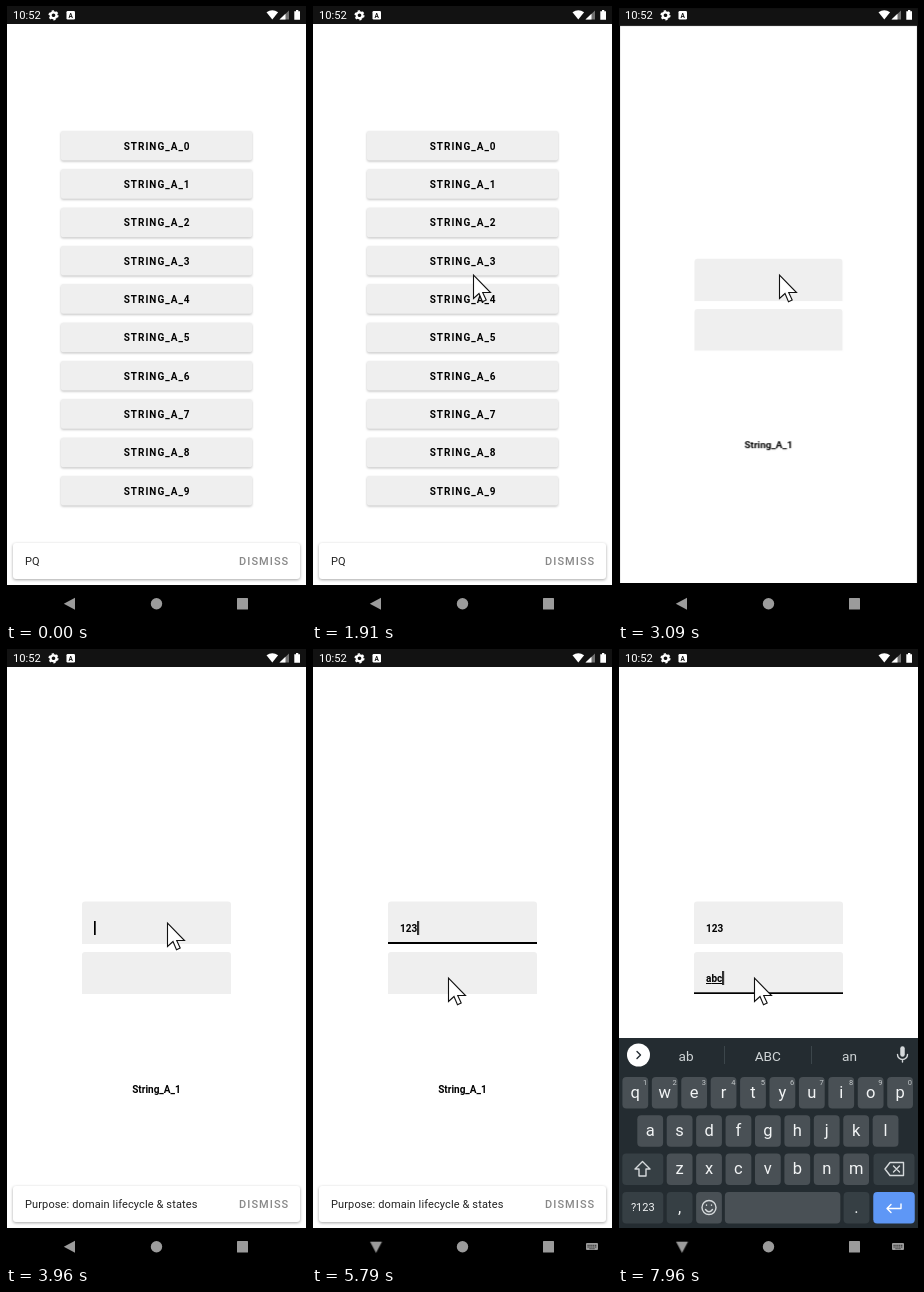
Animation, 300 px wide and 615 px high, one loop 8000 ms. Source, as an HTML page:

```html
<!DOCTYPE html>
<html lang="en">
<head>
<meta charset="utf-8">
<title>Phone form demo</title>
<style>
html, body { margin: 0; width: 100%; height: 100%; overflow: hidden; background: #000; }
svg { display: block; width: 100%; height: 100%; font-family: Roboto, "Noto Sans", sans-serif; }

.bold { font-weight: 700; font-size: 10px; }
.label { letter-spacing: 1px; }
.snack rect { fill: #fff; filter: drop-shadow(0 1.5px 1.8px rgba(0,0,0,.35)); }
.snack text { font-size: 11px; letter-spacing: .12px; fill: #222; }
.snack .action { font-weight: 500; letter-spacing: 1.05px; fill: #888; }
.face { fill: #efefef; }
#buttons rect { filter: drop-shadow(0 1px .8px rgba(0,0,0,.25)); }
.key { font-size: 16.5px; fill: #f2f4f5; text-anchor: middle; }
.hint { font-size: 7.5px; fill: #c3c8ca; text-anchor: middle; }
.word { font-size: 13.6px; fill: #cfd4d6; text-anchor: middle; }
.line { fill: none; stroke: #d5d9db; stroke-width: 1.4; stroke-linejoin: round; stroke-linecap: round; }
.composing tspan { text-decoration: underline; }

/* Every animation shares the 8 s loop; 1% = 80 ms */
.move { animation: 8s linear infinite; }
.step { animation: 8s step-end infinite; visibility: hidden; }

#cursor { animation-name: cursor; }
@keyframes cursor {
  0%, 4.75% { transform: translate(40px, 620px); }
  6.5% { transform: translate(98px, 505px); }
  8.5% { transform: translate(170px, 370px); }
  9.7% { transform: translate(191px, 295px); }
  11.2% { transform: translate(170px, 222px); }
  13.1%, 16.9% { transform: translate(134px, 178px); }
  20.5% { transform: translate(150px, 228px); }
  23.87%, 46.1% { transform: translate(161px, 269px); }
  46.5%, 55.1% { transform: translate(161px, 274px); }
  59.75%, 62% { transform: translate(148px, 304px); }
  68.8%, 100% { transform: translate(136px, 329px); }
}
#click { animation-name: click; }
@keyframes click {
  13.37%, 46.5%, 78.75% { visibility: visible; }
  14.87%, 48.12%, 80.25% { visibility: hidden; }
}
#ripple { animation-name: ripple; transform-origin: 134px 178px; opacity: 0; }
@keyframes ripple {
  0%, 16.8% { opacity: 0; transform: scale(.15); }
  17.8% { opacity: .1; transform: scale(.35); }
  20.5% { opacity: .1; transform: scale(1); }
  23.8%, 100% { opacity: 0; transform: scale(1); }
}
.window { transform-origin: 150.5px 298px; }
#list { animation-name: list; }
@keyframes list {
  0%, 36% { transform: none; visibility: visible; }
  38.2% { transform: scale(1.05); visibility: visible; }
  38.25%, 100% { transform: scale(1.05); visibility: hidden; }
}
#form { animation-name: form; opacity: 0; }
@keyframes form {
  0%, 36% { opacity: 0; transform: scale(.85); }
  37.1% { opacity: 1; transform: scale(.95); }
  38.62% { opacity: 1; transform: scale(.993); }
  40.12%, 100% { opacity: 1; transform: none; }
}
#notice { animation-name: notice; transform-origin: 150.5px 555px; opacity: 0; }
@keyframes notice {
  0%, 47% { opacity: 0; transform: scale(.8); }
  48.2% { opacity: .75; transform: scale(.96); }
  49.5%, 100% { opacity: 1; transform: none; }
}
#bar1 { animation-name: bar1; opacity: 0; }
@keyframes bar1 {
  0%, 53.24% { opacity: 0; }
  53.25%, 80.25% { opacity: 1; }
  82.5%, 100% { opacity: 0; }
}
#bar2 { animation-name: bar2; opacity: 0; }
@keyframes bar2 {
  0%, 80.25% { opacity: 0; }
  84.6%, 100% { opacity: 1; }
}
#caret { animation-name: caret; }
@keyframes caret {
  48.75% { visibility: visible; transform: none; }
  55.12% { visibility: hidden; transform: none; }
  57.5% { visibility: visible; transform: translateX(5.8px); }
  62.5% { visibility: visible; transform: translateX(11.5px); }
  68.75% { visibility: hidden; transform: translateX(11.5px); }
  72.37% { visibility: visible; transform: translateX(17.2px); }
  80.25% { visibility: visible; transform: translateY(50px); }
  84.62% { visibility: hidden; transform: translateY(50px); }
  90.75% { visibility: visible; transform: translate(5.4px, 50px); }
  94% { visibility: visible; transform: translate(11px, 50px); }
  99.5%, 100% { visibility: visible; transform: translate(16.2px, 50px); }
}
#c1 { animation-name: c1; }
@keyframes c1 { 57.5%, 100% { visibility: visible; } }
#c2 { animation-name: c2; }
@keyframes c2 { 62.5%, 100% { visibility: visible; } }
#c3 { animation-name: c3; }
@keyframes c3 { 72.37%, 100% { visibility: visible; } }
#ca { animation-name: ca; }
@keyframes ca { 90.75%, 100% { visibility: visible; } }
#cb { animation-name: cb; }
@keyframes cb { 94%, 100% { visibility: visible; } }
#cc { animation-name: cc; }
@keyframes cc { 99.5%, 100% { visibility: visible; } }
#keyboard { animation-name: keyboard; }
@keyframes keyboard { 74.25%, 100% { visibility: visible; } }
#tools { animation-name: tools; }
@keyframes tools { 74.25% { visibility: visible; } 97%, 100% { visibility: hidden; } }
#words { animation-name: words; }
@keyframes words { 97%, 100% { visibility: visible; } }
#back { animation-name: back; transform-origin: 64px 597.7px; }
@keyframes back {
  0%, 62% { transform: none; animation-timing-function: ease-in-out; }
  66%, 100% { transform: rotate(-90deg); }
}
#switcher { animation-name: switcher; }
@keyframes switcher { 57%, 100% { visibility: visible; } }
</style>
</head>
<body>
<svg viewBox="0 0 300 615">
  <defs>
    <clipPath id="screen"><rect x="1" width="299" height="615"/></clipPath>
    <clipPath id="pressed"><rect x="55" y="163" width="191" height="30" rx="2"/></clipPath>
    <g id="gear">
      <circle r="2.9" fill="none" stroke="currentColor" stroke-width="2.2"/>
      <circle r="4.3" fill="none" stroke="currentColor" stroke-width="1.6" stroke-dasharray="2.2 2.303"/>
    </g>
  </defs>
  <rect width="300" height="615"/>

  <g clip-path="url(#screen)">
    <g id="list" class="window move">
      <rect width="301" height="18" fill="#121212"/>
      <rect x="1" y="18" width="299" height="561" fill="#fff"/>
      <g id="buttons"></g>
      <g clip-path="url(#pressed)"><circle id="ripple" class="move" cx="134" cy="178" r="115"/></g>
      <g class="snack">
        <rect x="7" y="537" width="287" height="36" rx="3"/>
        <text x="19" y="559">PQ</text>
        <text class="action" x="233" y="559">DISMISS</text>
      </g>
    </g>

    <g id="form" class="window move">
      <rect width="301" height="18" fill="#121212"/>
      <rect x="1" y="18" width="299" height="561" fill="#fff"/>
      <path class="face" d="M76 295V255.500q0-3 3-3H222q3 0 3 3V295ZM76 345V306q0-3 3-3H222q3 0 3 3V345Z"/>
      <rect id="bar1" class="move" x="76" y="293" width="149" height="2"/>
      <rect id="bar2" class="move" x="76" y="343.300" width="149" height="1.700"/>
      <text class="bold" x="88" y="283"><tspan id="c1" class="step">1</tspan><tspan id="c2" class="step">2</tspan><tspan id="c3" class="step">3</tspan></text>
      <text class="bold composing" x="88" y="333"><tspan id="ca" class="step">a</tspan><tspan id="cb" class="step">b</tspan><tspan id="cc" class="step">c</tspan></text>
      <rect id="caret" class="step" x="88" y="272" width="1.700" height="14"/>
      <text class="bold" x="150.500" y="443.500" text-anchor="middle">String_A_1</text>
      <g id="notice" class="snack move">
        <rect x="7" y="537" width="287" height="36" rx="3"/>
        <text x="19" y="559">Purpose: domain lifecycle &amp; states</text>
        <text class="action" x="233" y="559">DISMISS</text>
      </g>
    </g>
  </g>

  <g id="keyboard" class="step">
    <rect x="1" y="389" width="299" height="190" fill="#242c31"/>
    <g id="keys"></g>
    <circle cx="20.500" cy="406" r="11.500" fill="#fff"/>
    <path class="line" d="M284.500 399.500v6" style="stroke-width:4.500"/>
    <path class="line" d="M279.500 405.500a5 5 0 0 0 10 0M284.500 410.500v2.500"/>
    <path class="line" d="M24.500 512.500l7.500 7.500h-4v7h-7v-7h-4z"/>
    <path class="line" d="M267 520l5-6.500h13.500v13H272zM275.500 517l6 6M281.500 517l-6 6"/>
    <circle class="line" cx="91" cy="558.500" r="7"/>
    <path class="line" d="M87.500 560.500q3.500 4.500 7 0M88.500 556v.3M93.500 556v.3"/>
    <path class="line" d="M283 555v4.500H269.500M273 555.500l-4 4 4 4" style="stroke:#fff"/>
  </g>
  <g id="tools" class="step" color="#cfd4d6">
    <path class="line" d="M22.500 402.500l-3.500 3.500 3.500 3.500" style="stroke:#242c31"/>
    <path class="line" d="M60 401h9v6l-4 4h-5zM69 407h-4v4"/>
    <text class="word" x="108" y="409.500" style="font-size:9px;font-weight:700">GIF</text>
    <use href="#gear" x="152" y="406"/>
    <path class="line" d="M191.500 401h9v10h-9zM194 401v-1.500h4v1.500M194 405h4M194 408h4"/>
    <path class="line" d="M235 406h.1M240 406h.1M245 406h.1" style="stroke-width:2.500"/>
  </g>
  <g id="words" class="step">
    <path class="line" d="M19 402.500l3.500 3.500-3.500 3.500" style="stroke:#242c31"/>
    <path d="M106.500 397v18M193.500 397v18" stroke="#3c464b"/>
    <text class="word" x="68" y="411.500">ab</text>
    <text class="word" x="149.800" y="411.500">ABC</text>
    <text class="word" x="231.500" y="411.500">an</text>
  </g>

  <g fill="#fff" color="#fff">
    <text x="7" y="13.200" font-size="11.200">10:52</text>
    <use href="#gear" x="47.500" y="9.300"/>
    <rect x="60.500" y="5" width="8.500" height="8.500" rx="1.200"/>
    <text x="64.750" y="11.700" font-size="6.500" font-weight="700" text-anchor="middle" fill="#121212">A</text>
    <path d="M266.300 13.500L260.500 6.300q5.800-4.300 11.600 0z"/>
    <path d="M283 4.500v9h-9.500z" fill-opacity=".4"/>
    <path d="M279.500 7.800v5.700h-6z"/>
    <path d="M288.300 5.200h1.700v-1.200h2.300v1.200h1.700v8.600h-5.700z"/>
  </g>

  <g fill="#9b9b9b">
    <path id="back" class="move" d="M57.800 597.700L69 591.700v12z"/>
    <circle cx="150.500" cy="597.700" r="5.700"/>
    <rect x="231" y="592" width="11" height="11.500" rx=".5"/>
    <g id="switcher" class="step">
      <rect x="274" y="594" width="12" height="7" rx="1"/>
      <path d="M275.500 596.300h9M275.500 598h9M277.500 599.800h5" stroke="#000" stroke-width=".8" stroke-dasharray="1.200 .7"/>
    </g>
  </g>

  <g id="cursor" class="move">
    <circle id="click" class="step" r="18" fill="#ff0" fill-opacity=".6"/>
    <path d="M.5 0V23.500L6 18.500 9.500 26.700 13.200 25 9.700 17.500H17.500Z" fill="#fff" stroke="#111" stroke-width="1.100"/>
  </g>
</svg>
<script>
const $ = id => document.getElementById(id);

function add(parent, tag, attrs, text = "") {
  const el = document.createElementNS("http://www.w3.org/2000/svg", tag);
  for (const name in attrs) el.setAttribute(name, attrs[name]);
  el.textContent = text;
  parent.append(el);
}

for (let i = 0; i < 10; i++) {
  const y = 125 + i * 38.33;
  add($("buttons"), "rect", { class: "face", x: 55, y, width: 191, height: 29.5, rx: 2 });
  add($("buttons"), "text", { class: "bold label", x: 117.7, y: y + 18.6 }, `STRING_A_${i}`);
}

const LIGHT = "#495055", DARK = "#363f44", PITCH = 29.42;

function key(cx, y, width, fill, label = "", size = 16.5) {
  add($("keys"), "rect", { x: cx - width / 2, y, width, height: 31.5, rx: 4, fill });
  add($("keys"), "text", { class: "key", x: cx, y: y + 15.5 + size * .32, style: `font-size:${size}px` }, label);
}

["qwertyuiop", "asdfghjkl", "zxcvbnm"].forEach((row, r) => {
  [...row].forEach((letter, i) => {
    const cx = [17.3, 32.2, 61.6][r] + i * PITCH, y = 428 + r * 38.2;
    key(cx, y, 25.8, LIGHT, letter);
    if (r === 0) add($("keys"), "text", { class: "hint", x: cx + 9.8, y: y + 8.2 }, (i + 1) % 10);
  });
});
key(24.8, 504.4, 41, DARK);
key(276, 504.4, 41, DARK);
key(24.8, 543, 41, DARK, "?123", 11);
key(61.6, 543, 25.8, DARK, ",");
key(91, 543, 25.8, LIGHT);
key(164.6, 543, 115.5, LIGHT);
key(238.5, 543, 25.8, DARK, ".");
key(276, 543, 41.5, "#5e97f6");
</script>
</body>
</html>
```
